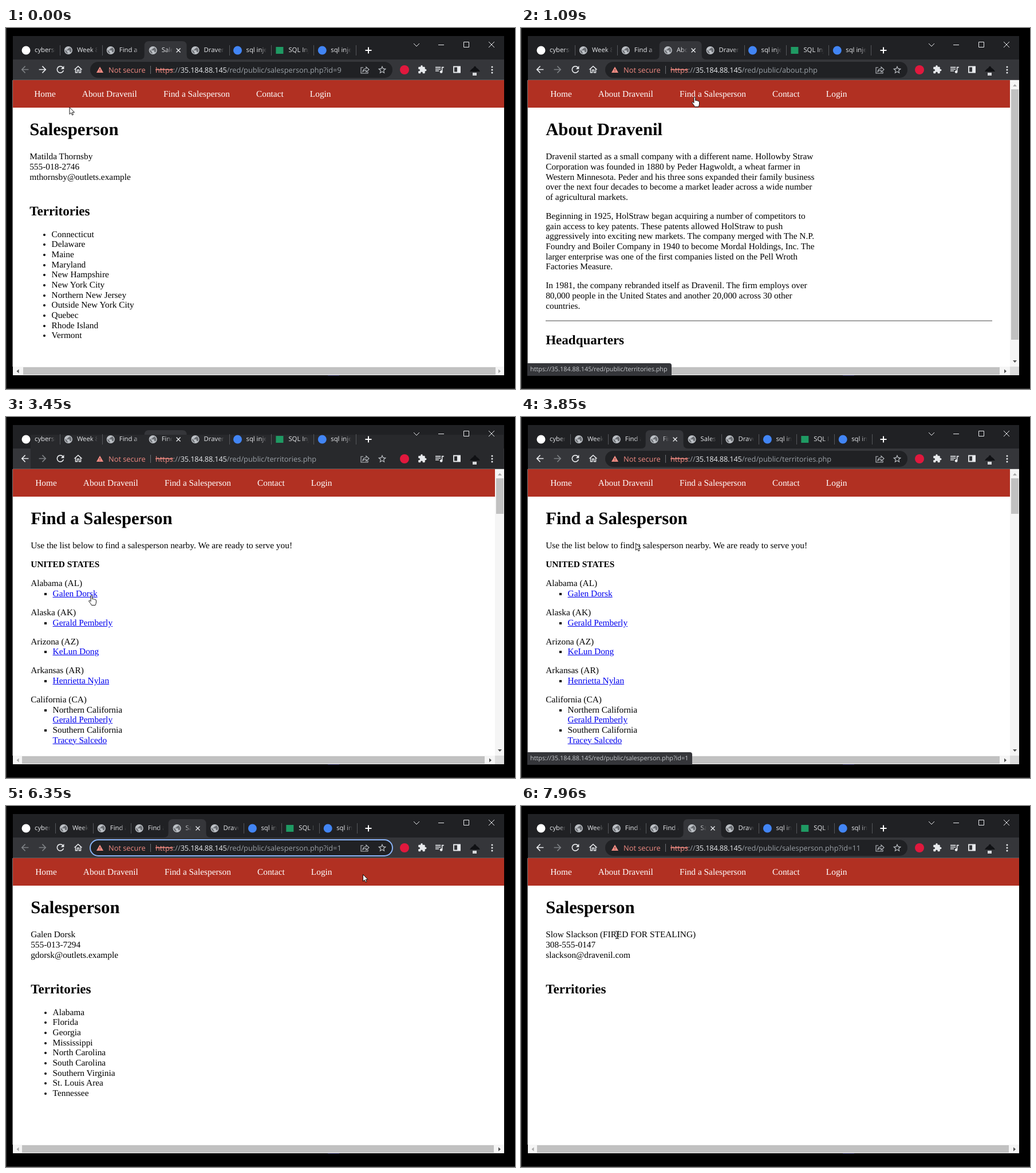
Animation, 889 px wide and 630 px high, one loop 8000 ms. Source, as an HTML page:

```html
<!DOCTYPE html>
<html lang="en">
<head>
<meta charset="utf-8">
<title>Browser session</title>
<style>
html, body { margin: 0; width: 100%; height: 100%; overflow: hidden; background: #000; }
#stage { position: relative; width: 889px; height: 630px; overflow: hidden; background: #000; text-rendering: geometricPrecision; }
#stage > * { position: absolute; }
svg { left: 0; top: 0; width: 889px; height: 630px; overflow: visible; }
svg text, .title, #status { font-family: "Open Sans", "Noto Sans", sans-serif; white-space: pre; }
.title { position: absolute; top: 31px; height: 16px; overflow: hidden; font-size: 11.3px; line-height: 16px; color: #e8eaed;
  -webkit-mask-image: linear-gradient(to left, transparent, #000 11px); mask-image: linear-gradient(to left, transparent, #000 11px); }
#tabs { left: 0; top: 0; }
#page { left: 12px; top: 91px; width: 858px; height: 500px; overflow: hidden; background: #fff; color: #000; box-shadow: -1px 0 #777;
  font: 15.36px/1.15 "Liberation Serif", "Times New Roman", serif; white-space: nowrap; }
nav { display: flex; gap: 46.08px; height: 48px; padding-left: 39.2px; background: #b13022; color: #fff; line-height: 49px; }
main { padding: .8px 0 0 31.2px; }
h1 { font-size: 30.72px; margin: .67em 0; }
h2 { font-size: 23.04px; margin: .83em 0; }
p { margin: 1em 0; }
ul { margin: 0; padding-left: 2.5em; }
.squares { list-style: square; }
.details { padding-bottom: 1.15em; }
.state { margin: 1em 0; }
u { color: #00e; }
hr { width: 780px; margin: .5em 0; box-sizing: border-box; border: solid; border-width: 1px 0; border-color: #a2a2a2 #ececec; }
#status { left: 11px; top: 585px; height: 22px; padding: 0 7px 0 5px; background: #35363a; color: #c8cbcf;
  border-radius: 0 4px 0 0; font-size: 10.82px; line-height: 22px; }
</style>
</head>
<body>
<div id="stage">
  <svg id="frame">
    <path d="M.5 0V629.5H889" fill="none" stroke="#3c3c3c"/>
    <rect x="12" y="14" width="858" height="592" fill="#202124"/>
    <rect x="12" y="55" width="858" height="36" fill="#35363a"/>
    <path id="activeTab" fill="#35363a"/>
    <rect x="147" y="59" width="528" height="28" rx="14" fill="#202124"/>
    <rect id="dim" x="43" y="31" width="826" height="59" fill="#28292c"/>
    <path d="M12 90.5H870" stroke="#5c5c5f"/>
    <g id="icons"></g>
  </svg>
  <div id="tabs"></div>
  <div id="page"></div>
  <svg id="bars"></svg>
  <div id="status"></div>
  <svg id="address">
    <g id="panel">
      <rect x="146" y="57" width="530" height="118" rx="14" fill="#35363a" stroke="#26272a"/>
      <rect x="146" y="94" width="530" height="36" fill="#494a4e"/>
      <g fill="#e8eaed" font-size="12.8">
        <text x="183" y="117">35.184.88.145/red/public/salesperson.php?id=11</text>
        <text x="183" y="153">35.184.88.145/red/public/salesperson.php</text>
      </g>
    </g>
    <rect id="ring" x="147" y="59" width="528" height="28" rx="14" fill="none" stroke="#8ab4f8" stroke-width="2"/>
    <rect id="selection" x="261" y="63" width="326" height="18" fill="#3f638b"/>
    <g id="secure"></g>
    <text id="url" x="261" y="77.5" font-size="12.8" fill="#9aa0a6"><tspan fill="#f28b82" text-decoration="line-through">https</tspan>://<tspan fill="#e8eaed" letter-spacing="-.18">35.184.88.145</tspan><tspan id="path"></tspan></text>
    <rect id="caret" x="587" y="62" width="1" height="19" fill="#e8eaed"/>
  </svg>
  <svg id="cursor"></svg>
</div>
<script>
const $ = id => document.getElementById(id);
const LOOP = 8000;

// Icons on a 24-unit grid
const GLYPH = {
  globe: 'M12 2C6.48 2 2 6.48 2 12s4.48 10 10 10 10-4.48 10-10S17.52 2 12 2zm-1 17.93c-3.95-.49-7-3.85-7-7.93 0-.62.08-1.21.21-1.79L9 15v1c0 1.1.9 2 2 2v1.93zm6.9-2.54c-.26-.81-1-1.39-1.9-1.39h-1v-3c0-.55-.45-1-1-1H8v-2h2c.55 0 1-.45 1-1V7h2c1.1 0 2-.9 2-2v-.41c2.93 1.19 5 4.06 5 7.41 0 2.08-.8 3.97-2.1 5.39z',
  back: 'M20 11H7.83l5.59-5.59L12 4l-8 8 8 8 1.41-1.41L7.83 13H20z',
  forward: 'M12 4l-1.41 1.41L16.17 11H4v2h12.17l-5.58 5.59L12 20l8-8z',
  reload: 'M17.65 6.35C16.2 4.9 14.21 4 12 4c-4.42 0-7.99 3.58-7.99 8s3.57 8 7.99 8c3.73 0 6.84-2.55 7.73-6h-2.08c-.82 2.33-3.04 4-5.65 4-3.31 0-6-2.69-6-6s2.69-6 6-6c1.66 0 3.14.69 4.22 1.78L13 11h7V4z',
  home: 'M12 5.69l5 4.5V18h-2v-6H9v6H7v-7.81l5-4.5M12 3L2 12h3v8h6v-6h2v6h6v-8h3z',
  warning: 'M1 21h22L12 2zm12-3h-2v-2h2zm0-4h-2v-4h2z',
  star: 'M22 9.24l-7.19-.62L12 2 9.19 8.63 2 9.24l5.46 4.73L5.82 21 12 17.27 18.18 21l-1.63-7.03zM12 15.4l-3.76 2.27 1-4.28-3.32-2.88 4.38-.38L12 6.1l1.71 4.04 4.38.38-3.32 2.88 1 4.28z',
  puzzle: 'M20.5 11H19V7c0-1.1-.9-2-2-2h-4V3.5a2.5 2.5 0 0 0-5 0V5H4c-1.1 0-2 .9-2 2v3.8h1.5a2.7 2.7 0 0 1 0 5.4H2V20c0 1.1.9 2 2 2h3.8v-1.5a2.7 2.7 0 0 1 5.4 0V22H17c1.1 0 2-.9 2-2v-4h1.5a2.5 2.5 0 0 0 0-5z',
  music: 'M15 6H3v2h12zm0 4H3v2h12zM3 16h8v-2H3zM17 6v8.18c-.31-.11-.65-.18-1-.18-1.66 0-3 1.34-3 3s1.34 3 3 3 3-1.34 3-3V8h3V6z'
};
const LIGHT = '#e8eaed', GREY = '#bdc1c6', FAINT = '#7d8084';
const icon = (name, x, y, size = .8, fill = LIGHT) =>
  `<path d="${GLYPH[name]}" fill="${fill}" fill-rule="evenodd" transform="translate(${x} ${y}) scale(${size}) translate(-12 -12)"/>`;
const line = (d, color = LIGHT, width = 1) => `<path d="${d}" fill="none" stroke="${color}" stroke-width="${width}"/>`;
const rect = (x, y, w, h, fill) => `<rect x="${x}" y="${y}" width="${w}" height="${h}" fill="${fill}"/>`;
const dot = (x, y, r, fill) => `<circle cx="${x}" cy="${y}" r="${r}" fill="${fill}"/>`;

const FIXED = [
  line('M712 27l5 5 5-5M755 29.5h10M799.5 24.5h9v9h-9zM843 24l10 10m0-10l-10 10'),
  line('M627.5 39h11M633 33.5v11', '#fff', 2),
  icon('reload', 95, 72.5), icon('home', 126, 72.5, .75),
  line('M624 69h-4v10h12v-3M623 76q1-5 6-5v-3l5 4.5-5 4.5v-3q-4 0-6 2z', GREY, 1.1),
  icon('star', 657, 73, .72, GREY),
  dot(696, 73, 8, '#e1183d'),
  icon('puzzle', 727, 72.5, .68), icon('music', 757, 72.5, .78),
  line('M782 67.5h11v10h-11z', LIGHT, 1.8), rect(788, 67, 6, 11, LIGHT),
  '<path d="M810 76q3-5 6-6 3-7 6 0 3 1 6 6z" fill="#101114"/>', rect(815, 78, 7, 5, '#d5d7da'),
  dot(849, 68, 1.5, LIGHT), dot(849, 73, 1.5, LIGHT), dot(849, 78, 1.5, LIGHT)
].join('');
$('secure').innerHTML = icon('warning', 164, 73, .55, '#f28b82') +
  '<text x="179" y="77.5" font-size="12.8" fill="#f28b82">Not secure</text>' + line('M252.5 66v14', '#6b6e73');

// Page contents
const nav = '<nav>' + ['Home', 'About Dravenil', 'Find a Salesperson', 'Contact', 'Login']
  .map(s => `<span>${s}</span>`).join('') + '</nav>';
const sheet = (title, body) => `${nav}<main><h1>${title}</h1>${body}</main>`;
const items = list => list.map(s => `<li>${s}</li>`).join('');
const person = (details, areas) => sheet('Salesperson',
  `<div class="details">${details.join('<br>')}</div><h2>Territories</h2><ul>${items(areas)}</ul>`);
const state = (name, ...list) => `<div class="state">${name}<ul class="squares">${items(list)}</ul></div>`;

const PAGES = {
  nine: { title: 'Salesperson', path: 'salesperson.php?id=9', scroll: 2,
    html: person(['Matilda Thornsby', '555-018-2746', 'mthornsby@outlets.example'],
      ['Connecticut', 'Delaware', 'Maine', 'Maryland', 'New Hampshire', 'New York City', 'Northern New Jersey',
       'Outside New York City', 'Quebec', 'Rhode Island', 'Vermont']) },
  about: { title: 'About Dravenil', path: 'about.php', thumb: 437,
    html: sheet('About Dravenil', `<p>Dravenil started as a small company with a different name. Hollowby Straw<br>
Corporation was founded in 1880 by Peder Hagwoldt, a wheat farmer in<br>
Western Minnesota. Peder and his three sons expanded their family business<br>
over the next four decades to become a market leader across a wide number<br>of agricultural markets.</p>
<p>Beginning in 1925, HolStraw began acquiring a number of competitors to<br>
gain access to key patents. These patents allowed HolStraw to push<br>
aggressively into exciting new markets. The company merged with The N.P.<br>
Foundry and Boiler Company in 1940 to become Mordal Holdings, Inc. The<br>
larger enterprise was one of the first companies listed on the Pell Wroth<br>Factories Measure.</p>
<p>In 1981, the company rebranded itself as Dravenil. The firm employs over<br>
80,000 people in the United States and another 20,000 across 30 other<br>countries.</p><hr><h2>Headquarters</h2>`) },
  find: { title: 'Find a Salesperson', path: 'territories.php', thumb: 62,
    html: sheet('Find a Salesperson', '<p>Use the list below to find a salesperson nearby. We are ready to serve you!</p><p><b>UNITED STATES</b></p>' +
      state('Alabama (AL)', '<u>Galen Dorsk</u>') + state('Alaska (AK)', '<u>Gerald Pemberly</u>') +
      state('Arizona (AZ)', '<u>KeLun Dong</u>') + state('Arkansas (AR)', '<u>Henrietta Nylan</u>') +
      state('California (CA)', 'Northern California<br><u>Gerald Pemberly</u>', 'Southern California<br><u>Tracey Salcedo</u>')) },
  one: { title: 'Salesperson', path: 'salesperson.php?id=1',
    html: person(['Galen Dorsk', '555-013-7294', 'gdorsk@outlets.example'],
      ['Alabama', 'Florida', 'Georgia', 'Mississippi', 'North Carolina', 'South Carolina', 'Southern Virginia',
       'St. Louis Area', 'Tennessee']) },
  eleven: { title: 'Salesperson', path: 'salesperson.php?id=11',
    html: person(['Slow Slackson (FIRED FOR STEALING)', '308-555-0147', 'slackson@dravenil.com'], []) }
};

// Each track lists [start, value...]; a value holds until the next start
const at = (track, t) => track.filter(k => k[0] <= t).pop();
const during = (t, from, to) => t >= from && t < to;
const show = (id, on) => { $(id).style.display = on ? '' : 'none'; };

const pageTrack = [[0, 'nine'], [720, 'about'], [2460, 'find'], [4110, 'one'], [7150, 'eleven']];
const statusTrack = [[0, '', 0], [420, 'about.php', 1], [720, '', 0], [1090, 'territories.php', 1],
  [2730, 'territories.php', .5], [2870, '', 0], [3580, 'salesperson.php?id=1', 1], [3980, '', 0]];
const loads = [[420, 720], [2340, 2460], [3980, 4110], [7030, 7150]];
const cursorTrack = [
  [0, 'arrow', 110.5, 138], [120, 'arrow', 189, 130], [270, 'hand', 191, 124], [420, 'hand', 256, 122],
  [570, 'hand', 270, 121], [720, 'hand', 290, 121], [840, 'hand', 298, 120], [2080, 'arrow', 303, 122],
  [2340, 'arrow', 306, 124], [2460, 'arrow', 309, 126.5], [2580, 'arrow', 317, 139], [2730, 'arrow', 272, 161],
  [2870, 'arrow', 163, 255], [3020, 'arrow', 162, 274], [3170, 'arrow', 159, 296], [3320, 'hand', 148, 306],
  [3450, 'hand', 144, 311], [3730, 'arrow', 200, 220], [3860, 'arrow', 300, 60], [3980, 'arrow', 318, 38],
  [4110, 'arrow', 322, 45], [4230, 'beam', 331, 63], [4380, 'beam', 355, 70], [4500, 'beam', 385, 73],
  [4620, 'beam', 410, 75], [4740, 'beam', 425, 77], [4890, 'beam', 500, 79], [5010, 'beam', 529, 81],
  [5160, 'beam', 555, 84], [5280, 'beam', 578, 83], [5400, 'beam', 588, 81], [5550, 'beam', 590, 78],
  [5790, 'beam', 594, 74], [5950, 'arrow', 623, 119], [7690, 'arrow', 400, 170], [7810, 'beam', 162, 227],
  [7960, 'beam', 168, 225]
];
const OUTLINE = 'fill="#fff" stroke="#000" stroke-width=".9" stroke-linejoin="round"';
const POINTER = {
  arrow: `<path ${OUTLINE} d="M.5 .5V12.5L3.3 9.9L5.1 14L7 13.2L5.3 9.2H9Z"/>`,
  hand: `<path ${OUTLINE} d="M4 10.8V1.8Q4 .5 5.3 .5T6.6 1.8V6.5Q8.6 5.6 9.2 7Q11 6.4 11.5 7.8Q13.4 7.5 13.5 9.2V12Q13.5 14.5 12 17.5H5.5Q4.5 15 1 11Q.3 9.8 1.4 9.2T4 10.8"/>`,
  beam: line('M-3 -6.5Q0 -6.5 0 -5V5Q0 6.5 -3 6.5M3 -6.5Q0 -6.5 0 -5M0 5Q0 6.5 3 6.5', '#fff', 1.1)
};

// Rewrites an element only when its markup changes
const last = {};
function fill(id, html) {
  if (last[id] !== html) $(id).innerHTML = last[id] = html;
}

function drawTabs(t, title) {
  const extra = t >= 3580, pitch = extra ? 65.9 : 73.9, active = t >= 3980 ? 4 : 3;
  const names = ['cybersecurity', 'Week 8', 'Find a Salesperson', extra ? 'Find a Salesperson' : title];
  if (extra) names.push('Salesperson');
  names.push('Dravenil', 'sql injection', 'SQL Injection', 'sql injection');
  const loading = loads.some(l => during(t, ...l));
  let titles = '', marks = '';
  names.forEach((name, i) => {
    const x = 35 + i * pitch, end = names.length - i, on = i === active;
    if (on && loading) marks += `<g transform="translate(${x} 39) rotate(${t * .36})">${line('M0 -6A6 6 0 1 1 -6 0', '#8ab4f8', 2)}</g>`;
    else if (i === 0) marks += dot(x, 39, 7.5, '#fff');
    else if (end === 2) marks += rect(x - 7, 33, 13, 12, '#1f9a63');
    else if (end < 4) marks += dot(x, 39, 7.5, '#4285f4');
    else marks += dot(x, 39, 6.5, '#6a6d72') + icon('globe', x, 39, .7, GREY);
    titles += `<div class="title" style="left:${x + 15}px;width:${pitch - (on ? 55 : 38)}px">${name}</div>`;
    if (on) marks += line(`M${x + pitch - 33} 35.5l7 7m0-7l-7 7`, LIGHT, 1.4);
    else if (i !== active - 1) marks += line(`M${Math.round(x + pitch - 15)}.5 30v18`, '#55575b');
  });
  const x = 20 + active * pitch, r = x + pitch;
  $('activeTab').setAttribute('d', `M${x - 8} 55q8 0 8-8V31q0-8 8-8H${r - 8}q8 0 8 8V47q0 8 8 8z`);
  fill('tabs', titles);
  return marks;
}

function drawBars({ scroll = 0, thumb }) {
  const right = thumb ? 854 : 870, dark = '#505050', pale = '#a8a8a8', track = '#f5f5f5', grey = '#c1c1c1';
  const tri = (d, color) => `<path d="${d}" fill="${color}"/>`;
  let s = rect(12, 591, right - 12, 15, track) +
    rect(28 + scroll, 592, (thumb ? 808 : 824) + scroll / 2, 13, grey) +
    tri('M22.500 595.500v7l-4-3.500z', scroll ? dark : pale) +
    tri(`M${right - 10} 595.500v7l4-3.500z`, scroll ? pale : dark);
  if (thumb) s += rect(854, 91, 16, 500, track) + rect(856, 107, 13, thumb, grey) + rect(854, 591, 16, 15, '#dcdcdc') +
    tri('M859 102h7l-3.500-4z', pale) + tri('M859 580h7l-3.500 4z', dark);
  fill('bars', s + rect(562, 606, 20, 1, '#17174a'));
}

function draw(now) {
  const t = now % LOOP, key = at(pageTrack, t)[1], page = PAGES[key];
  const marks = drawTabs(t, page.title);
  const canBack = key !== 'nine' && key !== 'one', canForward = key === 'nine';
  fill('icons', FIXED + icon('back', 33, 72.5, .8, canBack ? LIGHT : FAINT) +
    icon('forward', 64, 72.5, .8, canForward ? LIGHT : FAINT) + marks);
  fill('page', page.html);
  document.querySelectorAll('#page nav, #page main').forEach(el => {
    el.style.marginLeft = -(page.scroll || 0) + 'px';
  });
  drawBars(page);

  const typing = during(t, 6880, 7030);
  fill('path', '/red/public/' + (during(t, 6880, 7150) ? PAGES.eleven : page).path);
  $('url').setAttribute('x', typing ? 183 : 261);
  show('dim', during(t, 2460, 3730));
  show('panel', typing);
  show('secure', !typing);
  show('ring', during(t, 5010, 6880));
  show('selection', during(t, 5010, 5550));
  show('caret', during(t, 5790, 6350));

  const [, file, alpha] = at(statusTrack, t);
  fill('status', 'https://35.184.88.145/red/public/' + file);
  $('status').style.opacity = alpha;

  const [, kind, x, y] = at(cursorTrack, t);
  fill('cursor', POINTER[kind]);
  $('cursor').style.transform = `translate(${x}px, ${y}px)`;
  $('cursor').style.mixBlendMode = kind === 'beam' ? 'difference' : 'normal';
}

const start = performance.now();
function tick() {
  draw(performance.now() - start);
  requestAnimationFrame(tick);
}
tick();
</script>
</body>
</html>
```
